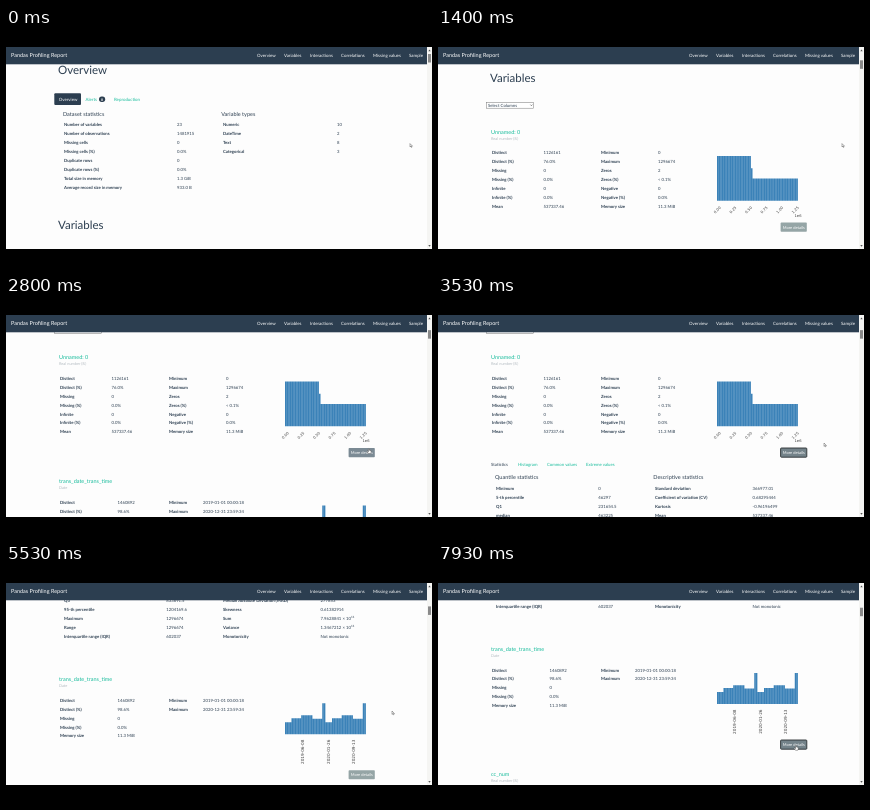
An HTML page that plays this animation: 426x240 px, repeating every 8000 ms.

```html
<!DOCTYPE html>
<html lang="en">
<head>
<meta charset="utf-8">
<title>Profiling report</title>
<style>
  html, body { margin: 0; width: 100%; height: 100%; overflow: hidden; background: #000; }
  svg { display: block; width: 100vw; height: 100vh; }
  text { font-family: Lato, sans-serif; fill: #2c3e50; text-rendering: geometricPrecision; white-space: pre; }
  .bold { font-weight: 700; }
  .link { fill: #18bc9c; }
  .muted { fill: #b4bcc2; }
  .white { fill: #fff; }
  .axis { font-family: "DejaVu Sans", sans-serif; fill: #444; text-anchor: middle; }
  .bars { fill: #3b82b8; }
</style>
</head>
<body>
<svg id="stage" viewBox="0 0 426 240">
  <rect width="426" height="240" fill="#fdfdfd"/>
  <g id="page"><g id="top"></g><g id="details"></g><g id="below"></g></g>
  <g id="chrome">
    <rect y="19" width="421" height="17.3" fill="#2c3e50"/>
    <rect x="421" y="19" width="5" height="202" fill="#f5f5f3"/>
    <path d="M422.3 23.3h2.4l-1.2-1.7zM422.3 217h2.4l-1.2 1.7z" fill="#555"/>
    <rect id="thumb" x="422" width="3" height="8.5" fill="#8a8a8a"/>
    <rect width="426" height="19"/>
    <rect y="221" width="426" height="19"/>
  </g>
  <g id="cursor" stroke="#333" stroke-width=".4" fill="#fff">
    <path id="arrow" d="M0 0v3.4l.8-.7.6 1.1.6-.3-.6-1h1.1z"/>
    <path id="hand" d="M-.4 0q.5-.5.9 0v1.5l1.8.5v1.6l-.6 1.2h-2.2l-1.5-2 .5-.4 1.1.7z"/>
  </g>
</svg>
<script>
const $ = id => document.getElementById(id);
const [overview, details, below] = ['top', 'details', 'below'].map($);
const DURATION = 8000, ROW = 8.95, EXPANSION = 122;
const OPEN_AT = 3050, SECOND_CLICK = 7800;

function add(parent, tag, attrs, content = '') {
  const el = document.createElementNS('http://www.w3.org/2000/svg', tag);
  for (const name in attrs) el.setAttribute(name, attrs[name]);
  el.textContent = content;
  return parent.appendChild(el);
}

// y is the vertical centre of the capitals
function label(parent, x, y, content, size = 4.25, cls = '', extra = {}) {
  return add(parent, 'text', { x, y: y + size * 0.36, 'font-size': size, class: cls, ...extra }, content);
}

function table(parent, labelX, valueX, y, rows) {
  rows.forEach(([name, value], i) => {
    label(parent, labelX, y + i * ROW, name, 4.25, 'bold');
    const [base, power] = value.split('^');
    const cell = label(parent, valueX, y + i * ROW, base);
    if (power) add(cell, 'tspan', { dy: -1.5, 'font-size': 3 }, power);
  });
}

function histogram(parent, bottom, heightAt) {
  let d = '';
  for (let i = 0; i < 50; i++) {
    const h = heightAt(i);
    d += `M${279 + i * 1.62} ${bottom}v${-h}h1.5v${h}z`;
  }
  add(parent, 'path', { d, class: 'bars' });
}

function tick(parent, x, y, content, size, angle) {
  label(parent, x, y, content, size, 'axis', { transform: `rotate(${angle} ${x} ${y})` });
}

function button(parent, y) {
  const box = add(parent, 'rect', { x: 342.6, y: y - 4.6, width: 26.2, height: 9.2, rx: 0.8 });
  label(parent, 355.7, y, 'More details', 4, 'white', { 'text-anchor': 'middle' });
  return (hover, focus) => {
    box.setAttribute('fill', focus ? '#74838a' : hover ? '#7b8a94' : '#95a5a6');
    box.setAttribute('stroke', focus ? '#2b3033' : 'none');
    box.setAttribute('stroke-width', 0.9);
  };
}

function variable(parent, y, name, kind) {
  label(parent, 53, y, name, 5.5, 'link');
  label(parent, 53, y + 6.3, kind, 3.9, 'muted');
}

// Overview
label(overview, 52, 42, 'Overview', 11.5);
add(overview, 'rect', { x: 48.3, y: 65.3, width: 26.7, height: 11.6, rx: 1, fill: '#2c3e50' });
label(overview, 52.7, 71.2, 'Overview', 4.4, 'white');
label(overview, 79.5, 71.2, 'Alerts', 4.4, 'link');
add(overview, 'rect', { x: 93, y: 68.6, width: 6.2, height: 5.4, rx: 2.7, fill: '#2c3e50' });
label(overview, 96.1, 71.3, '8', 3.5, 'white bold', { 'text-anchor': 'middle' });
label(overview, 108, 71.2, 'Reproduction', 4.4, 'link');
label(overview, 57, 86.2, 'Dataset statistics', 5.5);
table(overview, 58, 171, 96.4, [
  ['Number of variables', '23'], ['Number of observations', '1481915'],
  ['Missing cells', '0'], ['Missing cells (%)', '0.0%'],
  ['Duplicate rows', '0'], ['Duplicate rows (%)', '0.0%'],
  ['Total size in memory', '1.3 GiB'], ['Average record size in memory', '933.0 B']]);
label(overview, 215.3, 86.2, 'Variable types', 5.5);
table(overview, 217, 331, 96.4, [['Numeric', '10'], ['DateTime', '2'], ['Text', '8'], ['Categorical', '3']]);

// First variable
label(overview, 52, 197, 'Variables', 11.5);
add(overview, 'rect', { x: 48.4, y: 221.3, width: 47.2, height: 5.9, fill: '#fff', stroke: '#777', 'stroke-width': 0.5 });
label(overview, 50, 224.2, 'Select Columns', 4.3);
add(overview, 'path', { d: 'M92.4 223.6l1 1.1 1-1.1', fill: 'none', stroke: '#222', 'stroke-width': 0.5 });
variable(overview, 251, 'Unnamed: 0', 'Real number (ℝ)');
table(overview, 54, 105.5, 271.8, [
  ['Distinct', '1126161'], ['Distinct (%)', '76.0%'], ['Missing', '0'], ['Missing (%)', '0.0%'],
  ['Infinite', '0'], ['Infinite (%)', '0.0%'], ['Mean', '537337.46']]);
table(overview, 163, 220, 271.8, [
  ['Minimum', '0'], ['Maximum', '1296674'], ['Zeros', '2'], ['Zeros (%)', '< 0.1%'],
  ['Negative', '0'], ['Negative (%)', '0.0%'], ['Memory size', '11.3 MiB']]);
histogram(overview, 319.8, i => i < 21 ? 44.8 : i < 22 ? 32.5 : 22.3);
for (let i = 0; i < 6; i++) tick(overview, 279.3 + i * 15.6, 328.9, (i / 4).toFixed(2), 3.7, -45);
label(overview, 360, 334.7, '1e6', 3.7, 'axis');
const firstButton = button(overview, 346.2);

// Expanded statistics
[[53, 'Statistics', ''], [80, 'Histogram', 'link'], [109, 'Common values', 'link'], [148, 'Extreme values', 'link']]
  .forEach(([x, name, cls]) => label(details, x, 358.3, name, 4.3, cls));
label(details, 57, 370.4, 'Quantile statistics', 5.5);
table(details, 58, 160.3, 382.4, [
  ['Minimum', '0'], ['5-th percentile', '46297'], ['Q1', '231654.5'], ['median', '463225'],
  ['Q3', '833691.5'], ['95-th percentile', '1204169.6'], ['Maximum', '1296674'],
  ['Range', '1296674'], ['Interquartile range (IQR)', '602037']]);
label(details, 215.3, 370.4, 'Descriptive statistics', 5.5);
table(details, 217, 314.6, 382.4, [
  ['Standard deviation', '366977.01'], ['Coefficient of variation (CV)', '0.68295444'],
  ['Kurtosis', '-0.96196499'], ['Mean', '537337.46'], ['Median Absolute Deviation (MAD)', '277853'],
  ['Skewness', '0.61382914'], ['Sum', '7.9628841 × 10^11'], ['Variance', '1.3467212 × 10^11'],
  ['Monotonicity', 'Not monotonic']]);

// Second and third variables
variable(below, 375, 'trans_date_trans_time', 'Date');
table(below, 54, 111.5, 396, [
  ['Distinct', '1460892'], ['Distinct (%)', '98.6%'], ['Missing', '0'], ['Missing (%)', '0.0%'],
  ['Memory size', '11.3 MiB']]);
table(below, 163, 197, 396, [['Minimum', '2019-01-01 00:00:18'], ['Maximum', '2020-12-31 23:59:34']]);
histogram(below, 430, i => {
  const month = i % 25;
  return month < 4 ? 12 : month < 10 ? 16 : month < 17 ? 18.8 : month < 23 ? 15.5 : 31;
});
['2019-06-08', '2020-01-26', '2020-09-13']
  .forEach((date, i) => tick(below, 296.4 + i * 25.6, 447.7, date, 4.2, -90));
const secondButton = button(below, 470.6);
variable(below, 500, 'cc_num', 'Real number (ℝ)');

// Navigation bar
label($('chrome'), 5, 27.4, 'Pandas Profiling Report', 5.5, 'white');
[[251, 'Overview'], [278, 'Variables'], [304, 'Interactions'], [335, 'Correlations'],
 [367, 'Missing values'], [403, 'Sample']]
  .forEach(([x, name]) => label($('chrome'), x, 27.6, name, 4.4, 'white'));

// Keys are [time, ...values], eased between neighbours
const scrollKeys = [[0, 0], [400, 0], [1300, 147], [1500, 147], [2000, 182], [2300, 182],
  [2600, 189.6], [3700, 189.6], [4450, 297.4], [5000, 297.4], [5800, 412], [DURATION, 412]];
const cursorKeys = [[0, 404, 115.6], [2450, 404, 115.6], [2900, 357, 158], [3150, 357, 158],
  [3500, 386, 147], [5850, 386, 147], [6400, 358, 184.6], [6800, 358, 184.6],
  [7300, 358, 181.5], [DURATION, 358, 181.5]];

function sample(keys, t) {
  const i = keys.findIndex(key => key[0] > t);
  const from = keys[i - 1], to = keys[i];
  const p = (t - from[0]) / (to[0] - from[0]), eased = p * p * (3 - 2 * p);
  return from.slice(1).map((v, k) => v + (to[k + 1] - v) * eased);
}

function draw(now) {
  const t = now % DURATION;
  const [scroll] = sample(scrollKeys, t);
  const [x, y] = sample(cursorKeys, t);
  const open = t >= OPEN_AT;
  const shift = open ? EXPANSION : 0;
  const over = centre => x > 342 && x < 369 && Math.abs(y - centre + scroll) < 5;
  const overFirst = over(346.2), overSecond = over(470.6 + shift);

  $('page').setAttribute('transform', `translate(0 ${-scroll})`);
  details.style.display = open ? '' : 'none';
  below.setAttribute('transform', `translate(0 ${shift})`);
  firstButton(overFirst, open);
  secondButton(overSecond, t >= SECOND_CLICK);
  $('thumb').setAttribute('y', 26 + scroll * 0.043);
  $('cursor').setAttribute('transform', `translate(${x} ${y})`);
  $('hand').style.display = overFirst || overSecond ? '' : 'none';
  $('arrow').style.display = overFirst || overSecond ? 'none' : '';
  requestAnimationFrame(() => draw(performance.now() - start));
}
const start = performance.now();
draw(0);
</script>
</body>
</html>
```
